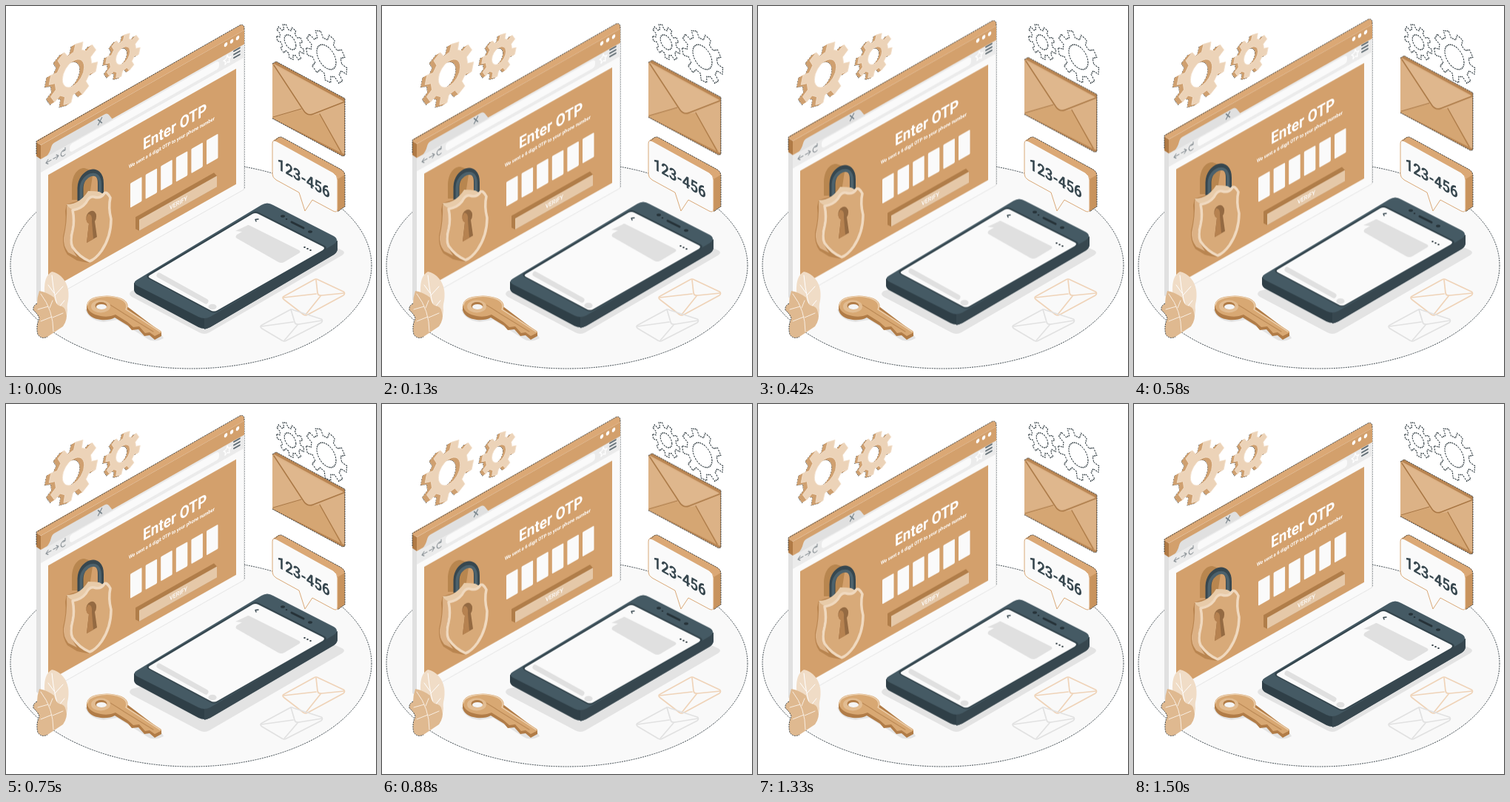
Recreate the animation shown at these times as an HTML page. Size 500 by 500 pixels, loop 1.54 s.

```html
<!DOCTYPE html>
<html lang="en">
<head>
<meta charset="utf-8">
<title>Enter OTP</title>
<style>
html, body { margin: 0; width: 100%; height: 100%; overflow: hidden; background: #fff; }
svg { display: block; width: 100vw; height: 100vh; }
text { font-family: Roboto, sans-serif; font-weight: 700; }
.float { animation: float 1540ms linear infinite; }
@keyframes float {
  0%, 97.4%, 100% { transform: translateY(0); }
  48.7% { transform: translateY(-10px); }
}
.line { fill: none; stroke-linecap: round; stroke-linejoin: round; }
.edge { fill: none; stroke: #263238; stroke-width: .9; stroke-dasharray: 2 1.2; }
</style>
</head>
<body>
<svg viewBox="0 0 500 500">
  <ellipse cx="250" cy="350.5" rx="244" ry="139.5" fill="#f9f9f9"/>
  <ellipse class="edge" cx="250" cy="350.5" rx="244" ry="139.5"/>

  <g id="gears"></g>

  <!-- browser window -->
  <g class="float">
    <path fill="#e0e0e0" d="M41 184L47 188V403L41 399Z"/>
    <path fill="#b07a45" d="M41 184L47 188V207L41 203Z"/>
    <path fill="#dba875" d="M41 184Q41 182 43 181L316 26Q319 24 322 28V33L47 188Z"/>
    <path class="edge" d="M41 200V183L316 26Q321 24 322 29V247"/>
    <g transform="matrix(1 -.565 0 1 47 188)">
      <rect width="275" height="215" fill="#fafafa"/>
      <path class="line" stroke="#e4e4e4" d="M0 215H274.5V36"/>
      <rect width="275" height="20" fill="#d3a06c"/>
      <rect y="19" width="275" height="18" fill="#ebebeb"/>
      <path fill="#e0e0e0" d="M7 20Q12 18 14 11Q15 7 19 7H86Q90 7 92 11L97 20Z"/>
      <rect x="39" y="21.5" width="202" height="11" rx="4" fill="#fafafa"/>
      <g class="line" stroke="#8b9297" stroke-width="1.1">
        <path d="M14 28H7M10 25L7 28L10 31M17 28H24M21 25L24 28L21 31"/>
        <path d="M33 25A3.4 4 0 1 0 33 31M33 22V25.5H30"/>
        <path stroke="#78848b" stroke-width="1.4" d="M77.5 9.5L82.500 16.500M82.500 9.500L77.500 16.500"/>
      </g>
      <path class="line" stroke="#fff" stroke-width="1.300" d="M252 21L253.500 25L257 25.500L254.500 28L255 32L252 30L249 32L249.500 28L247 25.500L250.500 25Z"/>
      <path class="line" stroke="#59666d" stroke-width="1.800" d="M261 20.500H269M261 25H269M261 29.500H269"/>
      <g fill="#fff">
        <ellipse cx="250" cy="5.500" rx="2.300" ry="2.700"/>
        <ellipse cx="258" cy="5.500" rx="2.300" ry="2.700"/>
        <ellipse cx="266" cy="5.500" rx="2.300" ry="2.700"/>
      </g>
      <rect x="10" y="46" width="254" height="156" fill="#d3a06c"/>
      <g id="digits" fill="#fafafa"></g>
      <path fill="#b07d49" d="M128 169.500H234L238 176V191H133L128 185.500Z"/>
      <rect x="133" y="176" width="105" height="15" fill="#e5c8a8"/>
    </g>
    <g fill="#fff">
      <text transform="matrix(.866 -.49 0 1 185 195)" font-size="22">Enter OTP</text>
      <text transform="matrix(.866 -.49 0 1 166 219.500)" font-size="6.800">We sent a 6 digit OTP to your phone number</text>
      <text transform="matrix(.866 -.49 0 1 233 269)" font-size="8.500" text-anchor="middle" style="font-weight:500">VERIFY</text>
    </g>

    <!-- padlock -->
    <path fill="#b8864f" d="M89 262V242C90 226 98 219 106 219L118 223L112 262Z"/>
    <path class="line" stroke="#37474f" stroke-width="8" stroke-linecap="butt" d="M100.500 267V246C101 224 128 214 128 240V258"/>
    <path class="line" stroke="#4d626c" stroke-width="4" stroke-linecap="butt" d="M101.500 266V247C102 228 127 218 127 241V257"/>
    <path fill="#b98550" d="M82 268L98 263L142 257L114 347Q108 347 96 344L83 336Q76 326 77 312Q82 292 80 277Z"/>
    <path fill="#e8cba9" d="M82 268Q92 268 99 263Q106 258 111 250Q120 250 126 251L135 256L120 268L92 277Q85 276 82 268Z"/>
    <path fill="#dcb185" d="M82 270L91 276Q91 293 86 315Q88 328 96 339L84 333Q77 324 78 313Q83 292 82 270Z"/>
    <path fill="#d8aa79" stroke="#f0d9bf" stroke-width="3.500" stroke-linejoin="round" d="M90 276Q102 274 108 266Q113 256 119 258Q128 261 133 253Q136 250 141 259Q138 272 142 288Q142 312 129 331Q121 342 113 345Q99 339 90 326Q86 318 90 303Q93 290 90 276Z"/>
    <path fill="#946a42" d="M112 294A6.700 9 15 1 1 120 291L123 312L109 320Z"/>
    <path fill="#b68250" d="M112 294A5 8 15 0 1 111 281Q117 281 116 291L118 315L109 320Z"/>
  </g>

  <!-- leaves -->
  <path fill="#f0dcc6" d="M62 359Q51 365 52 386Q54 411 71 434Q83 424 83 411Q82 406 84 398Q87 377 74 365Q68 360 62 359Z"/>
  <path class="line" stroke="#fff" d="M62 364Q65 397 76 426M65 388L57 377M66 391L77 379M70 409L79 398"/>
  <path fill="#dfb990" d="M45 385Q42 394 42 402Q36 405 37 411Q43 416 45 422Q40 433 43 444Q49 451 56 447L77 433Q84 423 81 414Q80 406 72 405Q67 403 65 394Q56 387 45 385Z"/>
  <path class="line" stroke="#f9eee2" d="M47 389Q64 411 64 440M57 406L43 410M62 420L47 426M63 421L77 415M59 408L63 398"/>
  <path class="edge" d="M42 402Q36 405 37 411Q43 416 45 422Q40 433 43 444Q48 451 56 447"/>

  <!-- drawn envelopes -->
  <g class="line" stroke-width="1.700">
    <g id="mail" stroke="#efd3b8">
      <path d="M376 392L416 370Q419 368 422 370L456 386Q459 388 456 391L408 417Q405 419 402 417L376 397Q372 394 376 392Z"/>
      <path d="M419 370L421 388Q422 392 427 391L457 388M375 394L419 389M405 417L425 392"/>
    </g>
    <use href="#mail" x="-30" y="41" id="grey-mail" style="display:none"/>
    <g stroke="#e1e1e1">
      <path d="M346 431L383 411Q386 409 389 411L426 423Q429 425 426 428L379 452Q376 454 373 452L346 436Q342 433 346 431Z"/>
      <path d="M385 410L390 427Q391 431 396 430L427 425M345 433L388 427M376 452L394 431"/>
    </g>
  </g>

  <!-- phone -->
  <path fill="#e3e3e3" d="M170 385Q164 389 170 393L261 441Q268 445 275 441L454 337Q460 333 454 330L430 319Z"/>
  <g class="float">
    <path fill="#2f3f47" d="M173 374V384Q174 388 178 390L260 434Q268 438 276 434L443 336Q448 333 448 327V317L268 400Z"/>
    <path fill="#37474f" d="M268 420V437Q272 436 276 434L443 336Q448 333 448 327V317Z"/>
    <path fill="#455a64" d="M177 370L345 269Q353 264 361 269L443 311Q451 316 443 322L276 420Q268 424 260 420L177 378Q170 374 177 370Z"/>
    <path fill="#34454d" d="M191 363L333 279Q337 276 342 279L431 324Q435 327 431 330L286 413Q281 416 276 413L192 368Q189 365 191 363Z"/>
    <path fill="#fafafa" d="M194 364L333 281Q337 279 341 281L428 325Q432 327 428 330L286 411Q281 414 276 411L195 368Q191 366 194 364Z"/>
    <path class="line" stroke="#263238" stroke-width="3" d="M386 292L402 300"/>
    <g fill="#263238">
      <ellipse cx="374" cy="284" rx="3" ry="1.800"/>
      <ellipse cx="379" cy="288" rx="1.300" ry=".9"/>
      <ellipse cx="411" cy="305" rx="3" ry="1.800"/>
      <ellipse cx="403.500" cy="326" rx="1.300" ry="1"/>
      <ellipse cx="407.500" cy="328" rx="1.300" ry="1"/>
      <ellipse cx="411.500" cy="330" rx="1.300" ry="1"/>
    </g>
    <path class="line" stroke="#37474f" stroke-width="1.400" d="M341 288L337 288.500L338 291"/>
    <path fill="#e0e0e0" d="M325 297Q327 295 330 297L396 330Q399 332 396 334L376 346Q372 348 368 346L312 314Q309 312 312 309L319 305L310 304Z"/>
    <path class="line" stroke="#e0e0e0" stroke-width="7" d="M207 364L270 399"/>
    <ellipse cx="279" cy="406.500" rx="5.500" ry="3.800" fill="#e0e0e0"/>
  </g>

  <!-- key -->
  <path fill="#e3e3e3" d="M107 410Q112 425 132 427L150 424L190 449Q200 456 213 449L209 442L150 410Z"/>
  <g id="key">
    <path fill="#b17c47" d="M109 403V411Q112 422 128 424Q140 425 147 421L165 432L170 438L179 437L187 446L194 445L201 451L210 446V441L165 407Z"/>
    <path fill="#d8a873" d="M109 404Q110 396 122 393Q140 389 156 395Q167 400 164 410L209 439Q211 441 209 442L201 446L194 441L188 442L180 433L172 434L164 427L148 417Q139 421 128 419Q111 416 109 404Z"/>
    <path class="line" stroke="#ecd0af" stroke-width="1.400" d="M110 404Q111 397 123 394Q140 390 155 396Q166 401 162 410L208 440"/>
    <path class="line" stroke="#bd8b57" stroke-width="1.300" d="M141 404Q151 410 160 416L199 440"/>
    <ellipse cx="128" cy="406" rx="13" ry="8.500" fill="#e2bc91"/>
    <ellipse cx="128.500" cy="405" rx="8" ry="5" fill="#b17c47"/>
    <ellipse cx="129" cy="406.500" rx="7" ry="3.600" fill="#f5f5f5"/>
  </g>

  <!-- sealed envelope -->
  <g class="float">
    <path fill="#b98552" d="M360 78L365 75L458 125V202L455 203L360 152Z"/>
    <path fill="#dcb286" d="M360 80Q361 77 364 79L455 128Q457 129 457 132V200L360 151Z"/>
    <path fill="#d5a673" d="M360 151L399 140Q408 150 424 146L456 200Z"/>
    <path class="line" stroke="#a97744" stroke-width="1.200" d="M361 150L399 139M424 146L453 198"/>
    <path fill="#dfb78d" d="M362 80L456 130L415 146Q408 149 403 142Z"/>
    <path class="line" stroke="#a97744" stroke-width="1.400" d="M362 80L402 141Q407 149 415 146L456 130"/>
    <path class="edge" d="M360 78L365 75L458 125V202L455 203L360 152"/>
  </g>

  <!-- message -->
  <path fill="#c8935d" d="M360 184L369 177L374 178L453 221Q458 224 458 230V271L448 278L440 240Z"/>
  <path fill="#dba875" d="M361 182L367 178Q370 176 374 178L453 221Q457 223 458 228L448 234Z"/>
  <path class="edge" d="M360 184L368 178Q371 176 374 178L453 221Q458 224 458 230V271L448 278"/>
  <path fill="#fafafa" stroke="#d9a877" stroke-width="1" d="M360 186Q360 180 366 183L442 225Q448 229 448 235V274Q448 280 442 277L414 262L404 277L396 252L365 235Q360 232 360 227Z"/>
  <text transform="matrix(.866 .49 0 1 366.500 220)" font-size="21.500" fill="#37474f">123-456</text>
</svg>
<script>
const NS = 'http://www.w3.org/2000/svg';
const add = (parent, name, attrs) => {
  const el = document.createElementNS(NS, name);
  for (const key in attrs) el.setAttribute(key, attrs[key]);
  return parent.appendChild(el);
};

// Cog outline with a round hole, flat in its own plane.
function cog(r, teeth, hole, turn) {
  const step = Math.PI * 2 / teeth;
  const profile = [[-.29, .75], [-.2, 1], [.2, 1], [.29, .75]];
  let d = '';
  for (let i = 0; i < teeth; i++)
    for (const [a, k] of profile) {
      const t = turn + (i + a) * step;
      d += (d ? 'L' : 'M') + (r * k * Math.cos(t)).toFixed(2) + ' ' + (r * k * Math.sin(t)).toFixed(2);
    }
  return `${d}ZM${hole} 0A${hole} ${hole} 0 1 0 ${-hole} 0A${hole} ${hole} 0 1 0 ${hole} 0Z`;
}

const gears = document.getElementById('gears');
const place = (x, y, tilt) => `matrix(.866 ${tilt} 0 1 ${x} ${y})`;

function solidGear(x, y, r, hole, depth) {
  const d = cog(r, 8, hole, .25);
  const layer = (k, attrs) => add(gears, 'path', {
    d, 'fill-rule': 'evenodd', transform: place(x - k, y + k * .6, -.5), ...attrs
  });
  layer(depth, { class: 'edge' });
  for (let k = depth; k > 0; k--) layer(k, { fill: '#cfa070' });
  layer(0, { fill: '#ecd3b8', stroke: '#f3e1cd', 'stroke-width': .8 });
}

function lineGear(x, y, r, hole) {
  add(gears, 'path', { d: cog(r, 9, hole, .1), transform: place(x, y, .5), class: 'edge', style: 'stroke-width:1.3' });
}

solidGear(91, 91, 38, 17, 6);
solidGear(158, 67, 27, 11, 4);
lineGear(384, 49, 21.5, 9);
lineGear(433, 69, 32, 15);

const digits = document.getElementById('digits');
for (let i = 0; i < 6; i++)
  add(digits, 'rect', { x: 121 + i * 20.6, y: 120, width: 15.5, height: 33, rx: 1.2 });

document.getElementById('grey-mail').remove();
</script>
</body>
</html>
```
